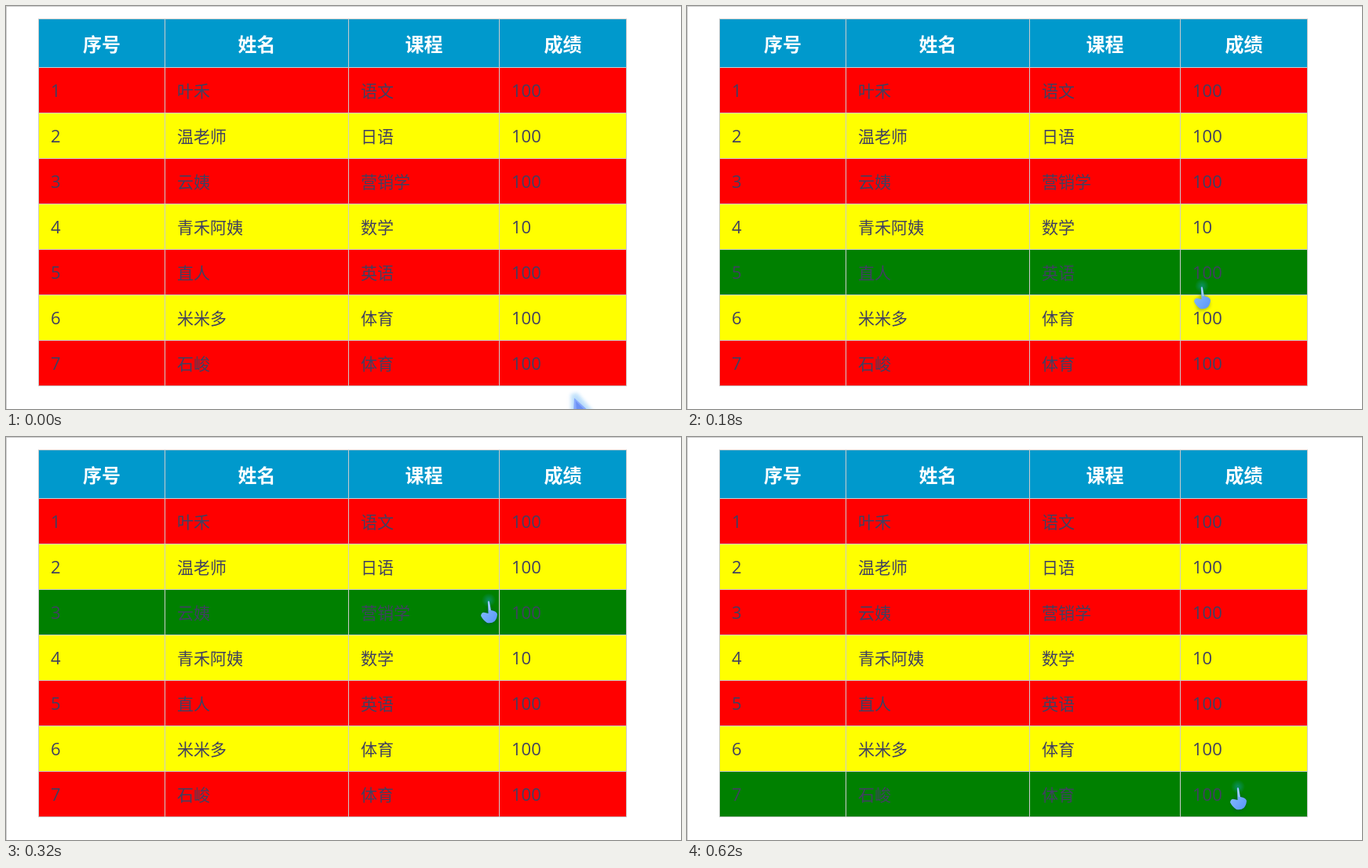
Recreate the animation shown at these times as an HTML page. Size 860 px wide and 514 px high, loop 0.68 s.

```html
<!DOCTYPE html>
<html lang="zh-CN">
<head>
<meta charset="utf-8">
<title>成绩表</title>
<style>
  html, body { margin: 0; width: 100%; height: 100%; overflow: hidden; background: #fff; }
  svg { display: block; }
  text { font: 21px "Noto Sans CJK SC", "Noto Sans CJK", sans-serif; fill: #404060; }
  .number { font: 22px "Open Sans", "Noto Sans", sans-serif; }
  .head { font-size: 24px; font-weight: 700; fill: #fff; text-anchor: middle; }
</style>
</head>
<body>
<svg id="stage" width="860" height="514" viewBox="0 0 860 514">
  <defs>
    <radialGradient id="tipGlow">
      <stop offset="0" stop-color="#109898" stop-opacity=".65"/>
      <stop offset="1" stop-color="#109898" stop-opacity="0"/>
    </radialGradient>
    <linearGradient id="skin" x1="0" y1="0" x2="1" y2="1">
      <stop offset="0" stop-color="#8cc4ff"/>
      <stop offset="1" stop-color="#5a94f8"/>
    </linearGradient>
    <filter id="soft" x="-50%" y="-50%" width="200%" height="200%">
      <feGaussianBlur stdDeviation="2"/>
    </filter>
  </defs>
  <path d="M0 .5H860M.5 0V514" stroke="#ccc"/>
  <g id="table"></g>
  <g id="hand">
    <circle cy="4" r="9" fill="url(#tipGlow)"/>
    <path d="M-9 22L-2 17V10L9 20L10 30L3 35H-5Z" fill="#003c50" opacity=".35" filter="url(#soft)"/>
    <path d="M-1.2 6Q0 4 1 6L3 17Q10 18 11 22Q10.5 28 7.5 31Q4 34 -2 33Q-7 30 -10 24Q-9 19 -5 20L-.5 21Z" fill="url(#skin)"/>
    <path d="M0 6.5L1.4 17" stroke="#b4dcff" stroke-width="1.2" fill="none"/>
  </g>
  <g id="arrow">
    <path d="M-3 0L2 -1L22 22H-3Z" fill="#9cc8f8" stroke="#b4dcfa" stroke-width="5" opacity=".8" filter="url(#soft)"/>
    <path d="M-1 3L20 22H-2Z" fill="#86a8fc"/>
    <path d="M1 7L14 20H2Z" fill="#6c90f4"/>
  </g>
</svg>
<script>
const columns = [41, 202, 436, 628, 790];
const headTop = 16, bodyTop = 78, rowHeight = 58, lineColor = '#ccc';
const heads = ['序号', '姓名', '课程', '成绩'];
const records = [
  ['叶禾', '语文', 100],
  ['温老师', '日语', 100],
  ['云姨', '营销学', 100],
  ['青禾阿姨', '数学', 10],
  ['直人', '英语', 100],
  ['米米多', '体育', 100],
  ['石峻', '体育', 100],
];

// Each pointer stop: start time in ms, x, y.
const stops = [
  [0, 725, 497], [20, 703, 465], [100, 683, 436], [180, 656, 353],
  [240, 626, 271], [320, 615, 204], [400, 604.5, 139],
  [550, 632, 212], [620, 702, 442],
];
const loop = 680;

const table = document.getElementById('table');
const hand = document.getElementById('hand');
const arrow = document.getElementById('arrow');

function add(tag, attributes, content = '') {
  const node = document.createElementNS('http://www.w3.org/2000/svg', tag);
  for (const name in attributes) node.setAttribute(name, attributes[name]);
  node.textContent = content;
  return table.appendChild(node);
}

function addBand(top, height, fill) {
  return add('rect', { x: columns[0] + 1, y: top + 1, width: columns[4] - columns[0] - 1, height: height - 1, fill });
}

add('rect', { x: 41, y: 16, width: 750, height: 469, fill: lineColor });
addBand(headTop, bodyTop - headTop, '#09c');
const bands = records.map((_, i) => addBand(bodyTop + i * rowHeight, rowHeight));
for (const x of columns.slice(1, 4)) {
  add('rect', { x, y: headTop, width: 1, height: 469, fill: lineColor });
}

heads.forEach((label, i) => {
  add('text', { x: (columns[i] + columns[i + 1] + 1) / 2, y: 58, class: 'head' }, label);
});
records.forEach((record, row) => {
  [row + 1, ...record].forEach((value, i) => {
    add('text', {
      x: columns[i] + 16,
      y: bodyTop + row * rowHeight + 38,
      class: typeof value === 'number' ? 'number' : '',
    }, value);
  });
});

function draw(now) {
  const time = now % loop;
  const [, x, y] = stops.findLast(stop => stop[0] <= time);
  const hovered = Math.floor((y - bodyTop) / rowHeight);
  const inside = hovered < records.length;
  bands.forEach((band, i) => {
    band.setAttribute('fill', i === hovered ? '#008000' : i % 2 ? '#ff0' : '#f00');
  });
  hand.style.display = inside ? '' : 'none';
  arrow.style.display = inside ? 'none' : '';
  (inside ? hand : arrow).setAttribute('transform', `translate(${x} ${y})`);
}

const start = performance.now();
function tick() {
  draw(performance.now() - start);
  requestAnimationFrame(tick);
}
tick();
</script>
</body>
</html>
```
